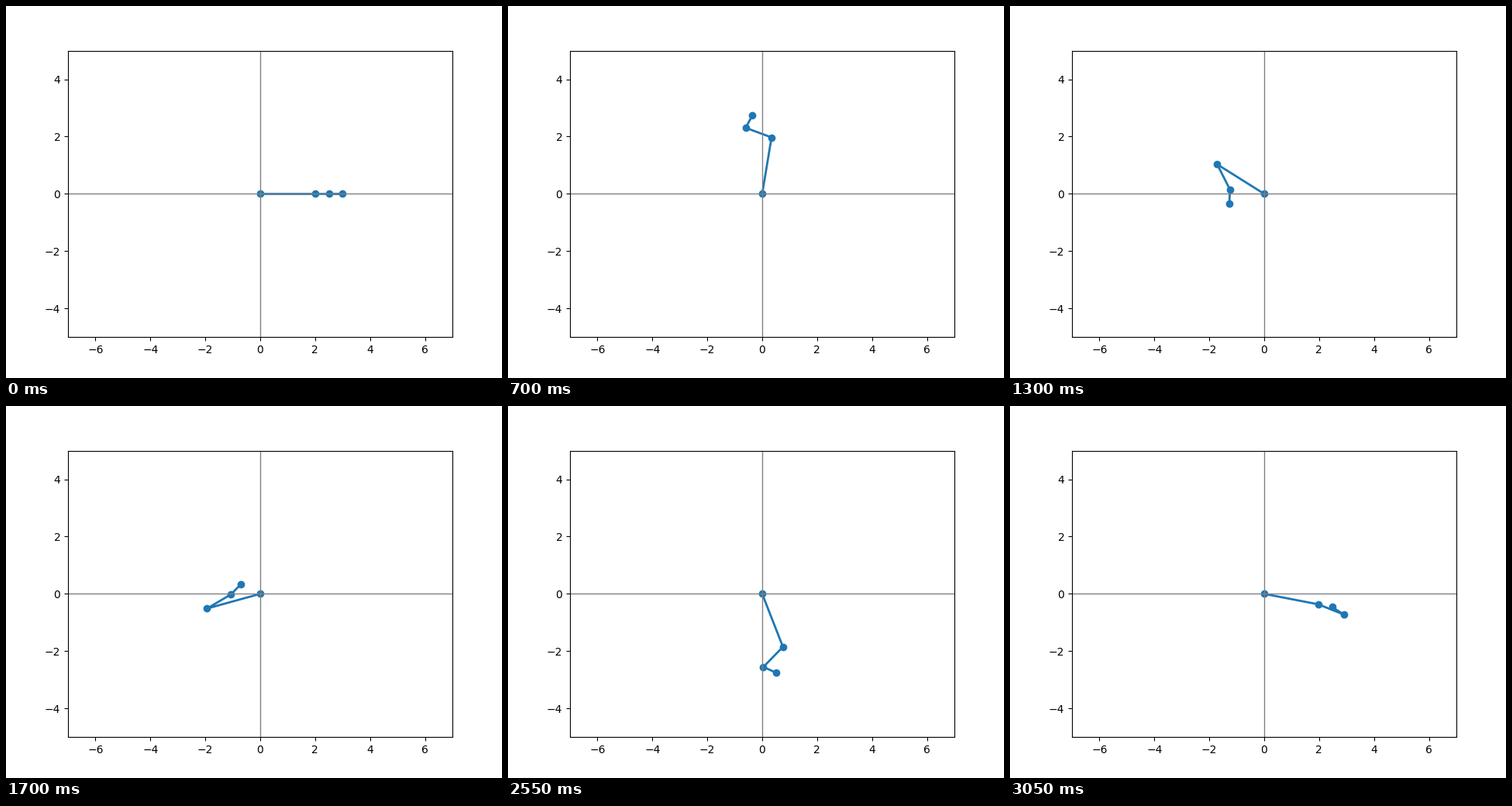
A matplotlib script that plays this animation: 640x480 px, repeating every 3100 ms.

```python
import numpy as np
import matplotlib.pyplot as plt
from matplotlib.animation import FuncAnimation

FRAMES = 62
STEP = 0.1  # radians per frame
LENGTHS = np.array([2.0, 1.0, 0.5])
SPEEDS = np.array([1, 2, 3])
PHASES = np.array([0, 0, np.pi])

fig, ax = plt.subplots(figsize=(6.4, 4.8), dpi=100)
ax.set_xlim(-7, 7)
ax.set_ylim(-5, 5)

arm, = ax.plot([], [], "o-", color="tab:blue", lw=2)
ax.axhline(0, color="gray", lw=1)
ax.axvline(0, color="gray", lw=1)


def joints(t):
    """Joint positions of the three-link arm, starting at the origin."""
    angles = SPEEDS * t + PHASES
    x = np.cumsum(LENGTHS * np.cos(angles))
    y = np.cumsum(LENGTHS * np.sin(angles))
    return np.append(0, x), np.append(0, y)


def update(i):
    arm.set_data(*joints(STEP * i))
    return arm,


anim = FuncAnimation(fig, update, frames=FRAMES, interval=50,
                     repeat=True, repeat_delay=0, blit=False)
plt.show()
```
